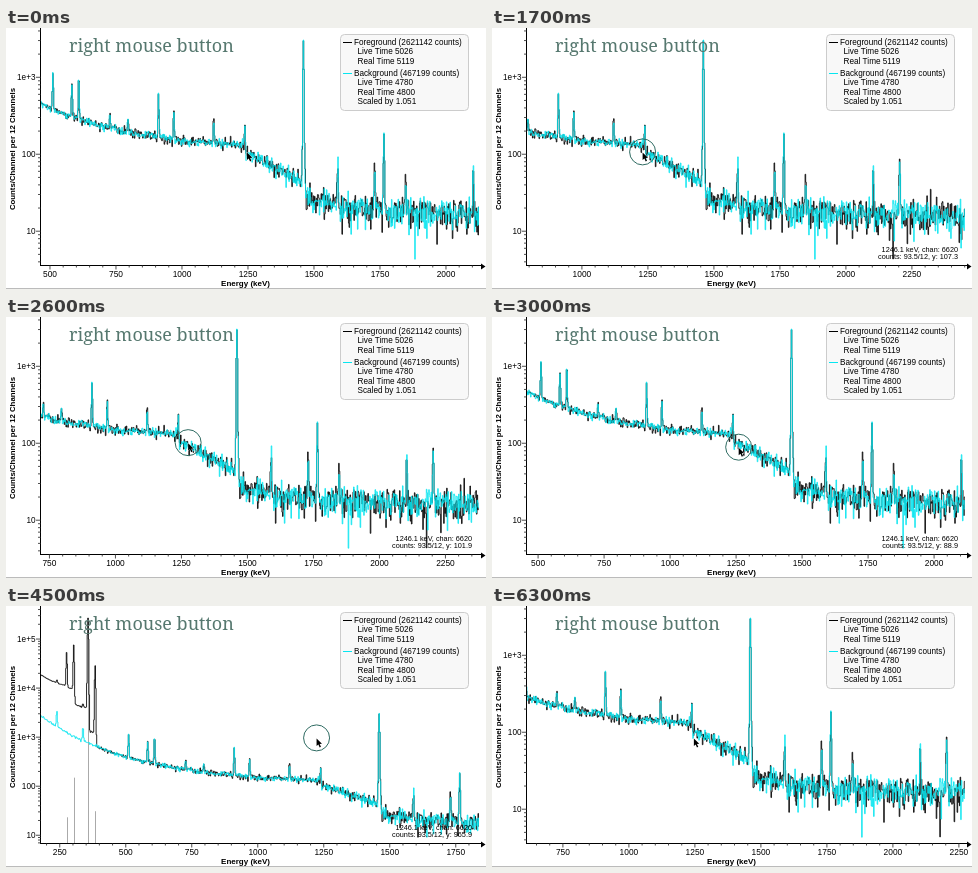
Recreate the animation shown at these times as an HTML page with a canvas. Size 480 by 261 pixels, loop 6.8 s.

```html
<!DOCTYPE html>
<html lang="en">
<head>
<meta charset="utf-8">
<title>Panning a spectrum</title>
<style>
  html, body { margin: 0; width: 100%; height: 100%; overflow: hidden; background: #fff; }
  canvas { display: block; width: 480px; height: 261px; }
</style>
</head>
<body>
<canvas id="stage"></canvas>
<script>
const W = 480, H = 261, LOOP = 6800, STEP = 100;
const LEFT = 35, RIGHT = 473, BOTTOM = 237, TOP_PAD = 12;
const PX_PER_KEV = 0.264, SPAN = (RIGHT - LEFT) / PX_PER_KEV;
const BIN = 2.26, BINS = 1073, FIRST = 149.2;
const GRABBED = 1246.1, LEAD = 45;
const CYAN = '#06e6f0', SANS = '"Liberation Sans", Arial, sans-serif';

const canvas = document.getElementById('stage');
const ctx = canvas.getContext('2d');
const ratio = window.devicePixelRatio || 1;
canvas.width = W * ratio;
canvas.height = H * ratio;

// time, energy at the left edge
const pan = [
  [0, 466], [700, 466], [1700, 792], [2050, 918], [2250, 918], [2300, 913],
  [3000, 458], [4000, 153], [4450, 153], [5200, 542], [5500, 614], [LOOP, 614]
];

// energy, log10 of the height
const sharedPeaks = [
  [239, 3.3], [338, 2.9], [511, 2.87], [583, 2.72], [609, 2.9], [727, 2.1], [795, 1.9],
  [911, 2.65], [969, 2.33], [1120, 2.2], [1238, 1.95], [1460, 3.475],
  [1590, 1.75], [1730, 1.75], [1765, 2.2], [1847, 1.45], [2103, 1.78], [2204, 1.83]
];

// step: counts scattered below the peak; strength: relative line height
const sourceLines = [
  { energy: 276, log: 4.63, step: 800, strength: 7.2 },
  { energy: 303, log: 4.82, step: 4900, strength: 18.3 },
  { energy: 357, log: 5.43, step: 2500, strength: 62 },
  { energy: 384, log: 4.45, step: 250, strength: 8.9 }
];

const clamp01 = v => Math.min(1, Math.max(0, v));
const progress = (time, from, to) => clamp01((time - from) / (to - from));
const smooth = p => p * p * (3 - 2 * p);

function leftAt(time) {
  const i = Math.max(1, pan.findIndex(row => row[0] >= time));
  const [t0, a] = pan[i - 1], [t1, b] = pan[i];
  return a + (b - a) * progress(time, t0, t1);
}

function continuum(energy) {
  let log = 1.2 + 0.22 * Math.exp(-(energy - 1466) / 250);
  if (energy < 1240) log = 2.05 + 1.48 * Math.exp(-(energy - 155) / 350);
  else if (energy < 1467) log = 2.02 - 0.0017 * (energy - 1240);
  return 10 ** (log - 0.0037 * Math.max(0, energy - 2420));
}

function sourceScatter(energy) {
  const steps = sourceLines.filter(line => energy < line.energy);
  return steps.reduce((sum, line) => sum + line.step, 0)
    + (steps.length && 11000 * Math.exp(-(energy - 155) / 60));
}

function randomizer(seed) {
  return () => (seed = (seed * 48271) % 2147483647) / 2147483647;
}

function makeSpectrum(base, peaks, seed) {
  const random = randomizer(seed);
  return Array.from({ length: BINS }, (_, bin) => {
    const energy = FIRST + bin * BIN;
    let mean = base(energy);
    for (const [center, log] of peaks) {
      mean += 10 ** (log - ((energy - center) / 3.6) ** 2);
    }
    const normal = Math.sqrt(-2 * Math.log(random())) * Math.cos(2 * Math.PI * random());
    const counts = Math.max(0.1, Math.sqrt(mean) + normal / 2) ** 2;
    const floor = energy < 1830 ? 0.96 : energy < 2460 ? 0.64 : -0.24;
    return Math.max(floor, Math.log10(counts));
  });
}

const fg = makeSpectrum(
  energy => continuum(energy) + sourceScatter(energy),
  [...sharedPeaks, ...sourceLines.map(line => [line.energy, line.log])],
  4127
);
const bg = makeSpectrum(continuum, sharedPeaks, 90317);
const setLow = (energy, log) => { bg[Math.round((energy - FIRST) / BIN)] = log; };
setLow(1882, 0.636);
setLow(2549, -0.24);

// The vertical range follows the counts in sight.
function viewAt(left) {
  const from = Math.max(0, Math.ceil((left - FIRST) / BIN));
  const to = Math.min(BINS, Math.floor((left + SPAN - FIRST) / BIN) + 1);
  const shown = [...fg.slice(from, to), ...bg.slice(from, to)];
  const high = Math.max(...shown), low = Math.min(...shown);
  const decade = BOTTOM * 0.925 / (high - low);
  return {
    left, from, to,
    x: energy => LEFT + (energy - left) * PX_PER_KEV,
    y: log => TOP_PAD + (high - log) * decade,
    log: y => high - (y - TOP_PAD) / decade
  };
}

function line(x1, y1, x2, y2, color = '#000', width = 1) {
  ctx.strokeStyle = color;
  ctx.lineWidth = width;
  ctx.beginPath();
  ctx.moveTo(x1, y1);
  ctx.lineTo(x2, y2);
  ctx.stroke();
}

function text(string, x, y, size, align = 'left', style = '', color = '#000', family = SANS) {
  ctx.font = `${style} ${size}px ${family}`;
  ctx.textAlign = align;
  ctx.fillStyle = color;
  ctx.fillText(string, x, y);
}

function drawSpectrum(data, color, view) {
  ctx.strokeStyle = color;
  ctx.lineWidth = 0.85;
  ctx.lineJoin = 'bevel';
  ctx.beginPath();
  for (let bin = Math.max(0, view.from - 1); bin < view.to; bin++) {
    const x = view.x(FIRST + (bin - 0.5) * BIN), y = view.y(data[bin]);
    ctx.lineTo(x, y);
    ctx.lineTo(x + BIN * PX_PER_KEV, y);
  }
  ctx.stroke();
}

function drawPlot(view) {
  ctx.save();
  ctx.beginPath();
  ctx.rect(LEFT, 0, RIGHT - LEFT, BOTTOM);
  ctx.clip();
  for (const { energy, strength } of sourceLines) {
    const x = Math.round(view.x(energy)) + 0.5;
    line(x, BOTTOM, x, BOTTOM - 3.57 * strength, '#aaa');
  }
  drawSpectrum(fg, '#000', view);
  drawSpectrum(bg, CYAN, view);
  ctx.restore();
}

function drawAxes(view) {
  line(LEFT - 0.5, 0, LEFT - 0.5, BOTTOM + 0.5);
  line(LEFT - 1, BOTTOM + 0.5, 476, BOTTOM + 0.5);
  ctx.fillStyle = '#000';
  ctx.beginPath();
  ctx.moveTo(475, 235.5);
  ctx.lineTo(479.5, 238.5);
  ctx.lineTo(475, 241.5);
  ctx.fill();

  for (let energy = Math.ceil(view.left / 50) * 50; energy <= view.left + SPAN; energy += 50) {
    const x = view.x(energy), major = energy % 250 === 0;
    line(x, BOTTOM, x, BOTTOM + (major ? 4.5 : 2.5), '#222', 0.8);
    if (major) text(energy, x, 249, 8.4, 'center');
  }

  for (let power = -1; power <= 5; power++) {
    for (let digit = 1; digit < 10; digit++) {
      const y = view.y(power + Math.log10(digit));
      if (y < 0 || y > BOTTOM) continue;
      line(digit === 1 ? 30 : 32, y, LEFT, y, '#222', 0.8);
      if (digit === 1) text(power > 2 ? `1e+${power}` : 10 ** power, 29.5, y + 3, 8.2, 'right');
    }
  }

  text('Energy (keV)', 239.5, 257.5, 8, 'center', 'bold');
  ctx.save();
  ctx.translate(8.8, 121);
  ctx.rotate(-Math.PI / 2);
  text('Counts/Channel per 12 Channels', 0, 0, 7.8, 'center', 'bold');
  ctx.restore();
  line(0, 260.5, W, 260.5, '#bbb');
}

function drawLegendEntry(y, color, heading, details) {
  line(337, y - 2.5, 346, y - 2.5, color);
  text(heading, 348, y, 8.2);
  details.forEach((detail, i) => text(detail, 351.5, y + 9.3 * (i + 1), 8.2));
}

function drawLegend() {
  ctx.fillStyle = '#f8f8f8';
  ctx.strokeStyle = '#ccc';
  ctx.lineWidth = 1;
  ctx.beginPath();
  ctx.roundRect(334.5, 6.5, 128, 76, 4);
  ctx.fill();
  ctx.stroke();
  drawLegendEntry(17, '#000', 'Foreground (2621142 counts)', ['Live Time 5026', 'Real Time 5119']);
  drawLegendEntry(48, CYAN, 'Background (467199 counts)',
    ['Live Time 4780', 'Real Time 4800', 'Scaled by 1.051']);
}

function drawPress(x, y) {
  ctx.strokeStyle = '#2f6b62';
  ctx.lineWidth = 1;
  ctx.beginPath();
  ctx.arc(x, y, 13, 0, 2 * Math.PI);
  ctx.stroke();
}

function drawArrow(x, y) {
  ctx.save();
  ctx.translate(x, y);
  ctx.fillStyle = '#000';
  ctx.strokeStyle = '#fff';
  ctx.lineWidth = 0.8;
  const arrow = new Path2D('M0 0V7.6L1.8 6 3.1 9 4.4 8.4 3.1 5.5 5.4 5.4Z');
  ctx.stroke(arrow);
  ctx.fill(arrow);
  ctx.restore();
}

function drawReadout(y, view) {
  const level = +(10 ** view.log(y)).toFixed(1);
  text(`${GRABBED} keV, chan: 6620`, 466, 223.5, 7.3, 'right');
  text(`counts: 93.5/12, y: ${level}`, 466, 231, 7.3, 'right');
}

function draw(time) {
  const view = viewAt(leftAt(time));
  const x = LEFT + (GRABBED - leftAt(time + LEAD)) * PX_PER_KEV;
  const y = 123.9 + 8 * smooth(progress(time, 2300, 3300));
  ctx.setTransform(ratio, 0, 0, ratio, 0, 0);
  ctx.fillStyle = '#fff';
  ctx.fillRect(0, 0, W, H);
  drawPlot(view);
  drawAxes(view);
  drawLegend();
  text('right mouse button', 63, 24, 18, 'left', '300', '#56786f', '"Noto Serif", serif');
  ctx.globalAlpha = progress(time, 0, 400) * (1 - progress(time, 5700, 6300));
  drawReadout(y, view);
  drawPress(x, y);
  ctx.globalAlpha = 1;
  drawArrow(x, y + 0.5);
}

const start = performance.now();
let drawn = -1;
function tick() {
  const time = Math.floor((performance.now() - start) % LOOP / STEP) * STEP;
  if (time !== drawn) draw(drawn = time);
  requestAnimationFrame(tick);
}
tick();
</script>
</body>
</html>
```
